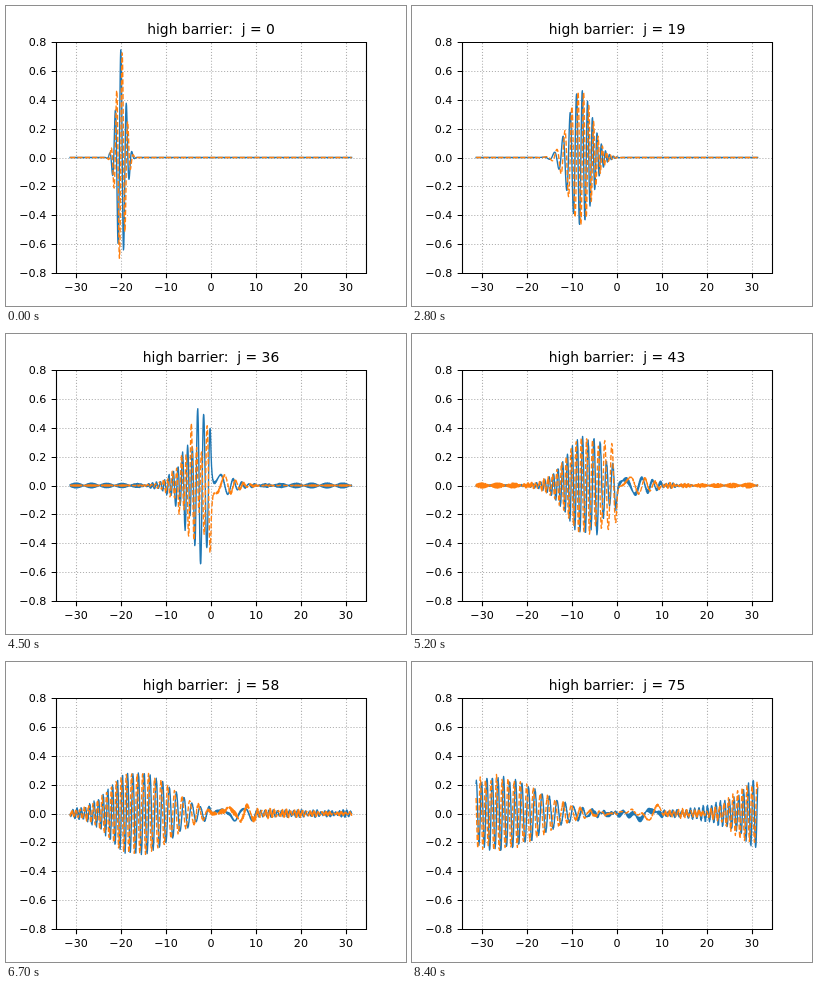
These frames come from a looping animation (400x300 px, 9400 ms). An HTML page:

```html
<!DOCTYPE html>
<html lang="en">
<head>
<meta charset="utf-8">
<title>Wave packet at a high barrier</title>
<style>
  html, body { margin: 0; width: 100%; height: 100%; overflow: hidden; background: #fff; }
  svg { display: block; }
  text { font: 11.11px "DejaVu Sans", sans-serif; }
  #title { font-size: 13.89px; }
  path { fill: none; stroke-width: 1.11; }
  .grid { stroke: #b0b0b0; stroke-dasharray: 1.11 1.83; }
  .axis { stroke: #000; }
  .wave { stroke-width: 1.39; stroke-linejoin: round; }
  #re { stroke: #1f77b4; stroke-linecap: square; }
  #im { stroke: #ff7f0e; stroke-dasharray: 5.14 2.22; }
</style>
</head>
<body>
<svg id="plot" width="400" height="300" viewBox="0 0 400 300"></svg>
<script>
const N = 1024, HALF = 12.5 * Math.sqrt(2 * Math.PI), DK = Math.PI / HALF;
const DT = 0.005, STEPS_PER_FRAME = 25, LAST = 75, LOOP = 9400;
const X0 = -20, K0 = 50 * DK, BARRIER = 20;

const svg = document.getElementById('plot');
const px = x => 205 + x * 155 / (1.1 * HALF);
const py = y => 151.5 - y * 144.375;
const snap = v => Math.floor(v + 0.5) + 0.5;

function add(tag, attrs, content = '') {
  const el = document.createElementNS('http://www.w3.org/2000/svg', tag);
  for (const name in attrs) el.setAttribute(name, attrs[name]);
  el.textContent = content;
  return svg.appendChild(el);
}
const path = (cls, d, id = cls) => add('path', { class: cls, d, id });
const label = (x, y, anchor, s) => add('text', { x, y, 'text-anchor': anchor }, s.replace('-', '\u2212'));

// Axes, from back to front: grid, curves, ticks and frame
let grid = '', ticks = 'M50.5 36.5H360.5V267.5H50.5Z';
for (let v = -30; v <= 30; v += 10) {
  const x = snap(px(v));
  grid += `M${x} 267.5V36.5`;
  ticks += `M${x} 267.5v4.86`;
  label(px(v), 285, 'middle', String(v));
}
for (let i = -4; i <= 4; i++) {
  const y = snap(py(i / 5));
  grid += `M50.5 ${y}H360.5`;
  ticks += `M50.5 ${y}h-4.86`;
  label(40.3, y + 3.7, 'end', (i / 5).toFixed(1));
}
path('grid', grid);
const rePath = path('wave', '', 're'), imPath = path('wave', '', 'im');
path('axis', ticks);
const title = add('text', { id: 'title', x: 205, y: 28, 'text-anchor': 'middle' });

// In-place radix-2 FFT; swapping the arguments gives the inverse times N
const cosT = new Float64Array(N / 2), sinT = new Float64Array(N / 2);
for (let i = 0; i < N / 2; i++) {
  cosT[i] = Math.cos(2 * Math.PI * i / N);
  sinT[i] = -Math.sin(2 * Math.PI * i / N);
}
function fft(re, im) {
  for (let i = 1, j = 0; i < N; i++) {
    let bit = N >> 1;
    for (; j & bit; bit >>= 1) j ^= bit;
    j ^= bit;
    if (i < j) {
      [re[i], re[j]] = [re[j], re[i]];
      [im[i], im[j]] = [im[j], im[i]];
    }
  }
  for (let half = 1; half < N; half *= 2) {
    const stride = N / (2 * half);
    for (let start = 0; start < N; start += 2 * half) {
      for (let n = 0; n < half; n++) {
        const a = start + n, b = a + half, c = cosT[n * stride], s = sinT[n * stride];
        const r = re[b] * c - im[b] * s, q = re[b] * s + im[b] * c;
        re[b] = re[a] - r; im[b] = im[a] - q;
        re[a] += r; im[a] += q;
      }
    }
  }
}

// Multiplier tables exp(-i * phase) * scale
function phases(phaseAt, scale = 1) {
  const c = new Float64Array(N), s = new Float64Array(N);
  for (let i = 0; i < N; i++) {
    c[i] = Math.cos(phaseAt(i)) * scale;
    s[i] = -Math.sin(phaseAt(i)) * scale;
  }
  return { c, s };
}
function rotate(re, im, { c, s }) {
  for (let i = 0; i < N; i++) {
    const r = re[i];
    re[i] = r * c[i] - im[i] * s[i];
    im[i] = r * s[i] + im[i] * c[i];
  }
}

const xs = Float64Array.from({ length: N }, (_, i) => -HALF + 2 * HALF * i / N);
const waveNumber = i => (i < N / 2 ? i : i - N) * DK;
const potential = phases(i => (xs[i] >= 0 && xs[i] <= 10 ? BARRIER * DT / 2 : 0));
const kinetic = phases(i => waveNumber(i) ** 2 * DT / 2, 1 / N);

// Gaussian packet advanced by the split-step method
const envelope = x => Math.PI ** -0.25 * Math.exp(-((x - X0) ** 2) / 2);
const re = xs.map(x => envelope(x) * Math.cos(K0 * x));
const im = xs.map(x => envelope(x) * Math.sin(K0 * x));

function advance(steps) {
  while (steps-- > 0) {
    rotate(re, im, potential);
    fft(re, im);
    rotate(re, im, kinetic);
    fft(im, re);
    rotate(re, im, potential);
  }
}
const curve = values =>
  'M' + Array.from(values, (v, i) => px(xs[i]).toFixed(2) + ' ' + py(v).toFixed(2)).join('L');

const frames = [];
for (let j = 0; j <= LAST; j++) {
  frames.push([curve(re), curve(im)]);
  advance(STEPS_PER_FRAME);
}

let shown = -1;
function draw(now) {
  const j = Math.min(LAST, Math.max(0, Math.floor((now % LOOP) / 100) - 9));
  if (j !== shown) {
    shown = j;
    rePath.setAttribute('d', frames[j][0]);
    imPath.setAttribute('d', frames[j][1]);
    title.textContent = `high barrier:\u00a0 j = ${j}`;
  }
  requestAnimationFrame(draw);
}
draw(performance.now());
</script>
</body>
</html>
```
